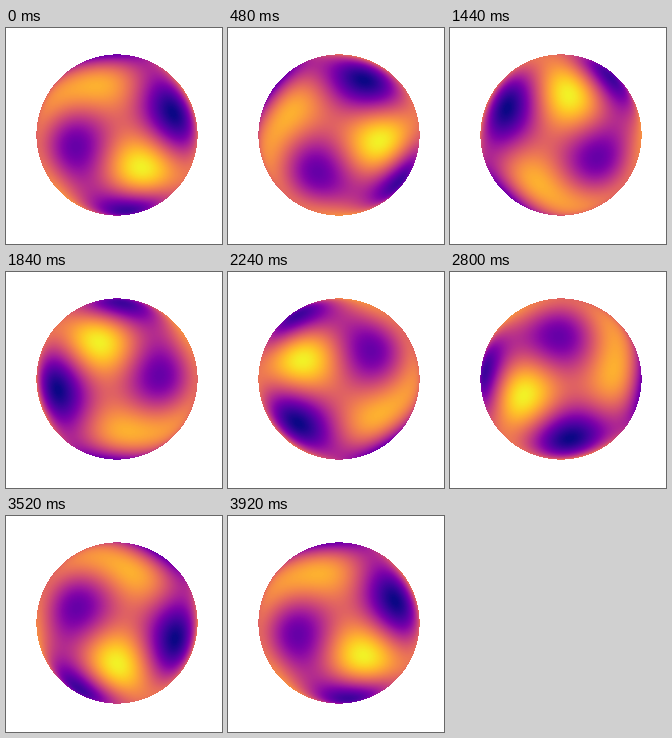
Animation of 216 by 216 pixels, one loop 4000 ms. Source, as a matplotlib script:

```python
import numpy as np
import matplotlib.pyplot as plt
from matplotlib.animation import FuncAnimation

SIZE, FRAMES = 216, 50
CX, CY, RADIUS = 111, 107, 80.6
WIDTH = 0.44  # spread of one lobe on the unit sphere

# Lobes of the field: angle (deg, counterclockwise), distance from centre, level
LOBES = [
    (-55, .49, .98), (17, .70, .02), (190, .50, .20), (97, .62, .79),
    (-84, .92, .10), (96, .98, .25), (28, 1.0, .70), (-106, 1.0, .60),
    (153, .80, .70), (-40, .95, .66), (-140, .85, .52),
]


def on_sphere(x, y):
    z = np.sqrt(np.clip(1 - x**2 - y**2, 0, None))
    return np.stack([x, y, z], axis=-1)


def kernel(a, b):
    """Gaussian of the chord length between points on the unit sphere."""
    return np.exp((a @ b.T - 1) / WIDTH**2)


angle, dist, level = np.array(LOBES).T
phi = np.radians(angle)
peaks = on_sphere(dist * np.cos(phi), dist * np.sin(phi))
weights = np.linalg.solve(kernel(peaks, peaks), level - 0.5)

rows, cols = np.mgrid[:SIZE, :SIZE] + 0.5
px, py = (cols - CX) / RADIUS, (CY - rows) / RADIUS
inside = px**2 + py**2 <= 1
points = on_sphere(px[inside], py[inside])


def surface(frame):
    turn = 2 * np.pi * frame / (FRAMES - 1)
    c, s = np.cos(turn), np.sin(turn)
    spin = np.array([[c, -s, 0], [s, c, 0], [0, 0, 1]])
    values = 0.5 + kernel(points, peaks @ spin.T) @ weights
    grid = np.ma.masked_all((SIZE, SIZE))
    grid[inside] = np.clip(values, 0, 1)
    return grid


fig = plt.figure(figsize=(SIZE / 100, SIZE / 100), dpi=100, facecolor="white")
ax = fig.add_axes([0, 0, 1, 1])
ax.axis("off")
image = ax.imshow(surface(0), cmap="plasma", vmin=0, vmax=1,
                  interpolation="nearest", aspect="auto")


def update(frame):
    image.set_data(surface(frame))
    return (image,)


anim = FuncAnimation(fig, update, frames=FRAMES, interval=80,
                     repeat=True, repeat_delay=0)
plt.show()
```
